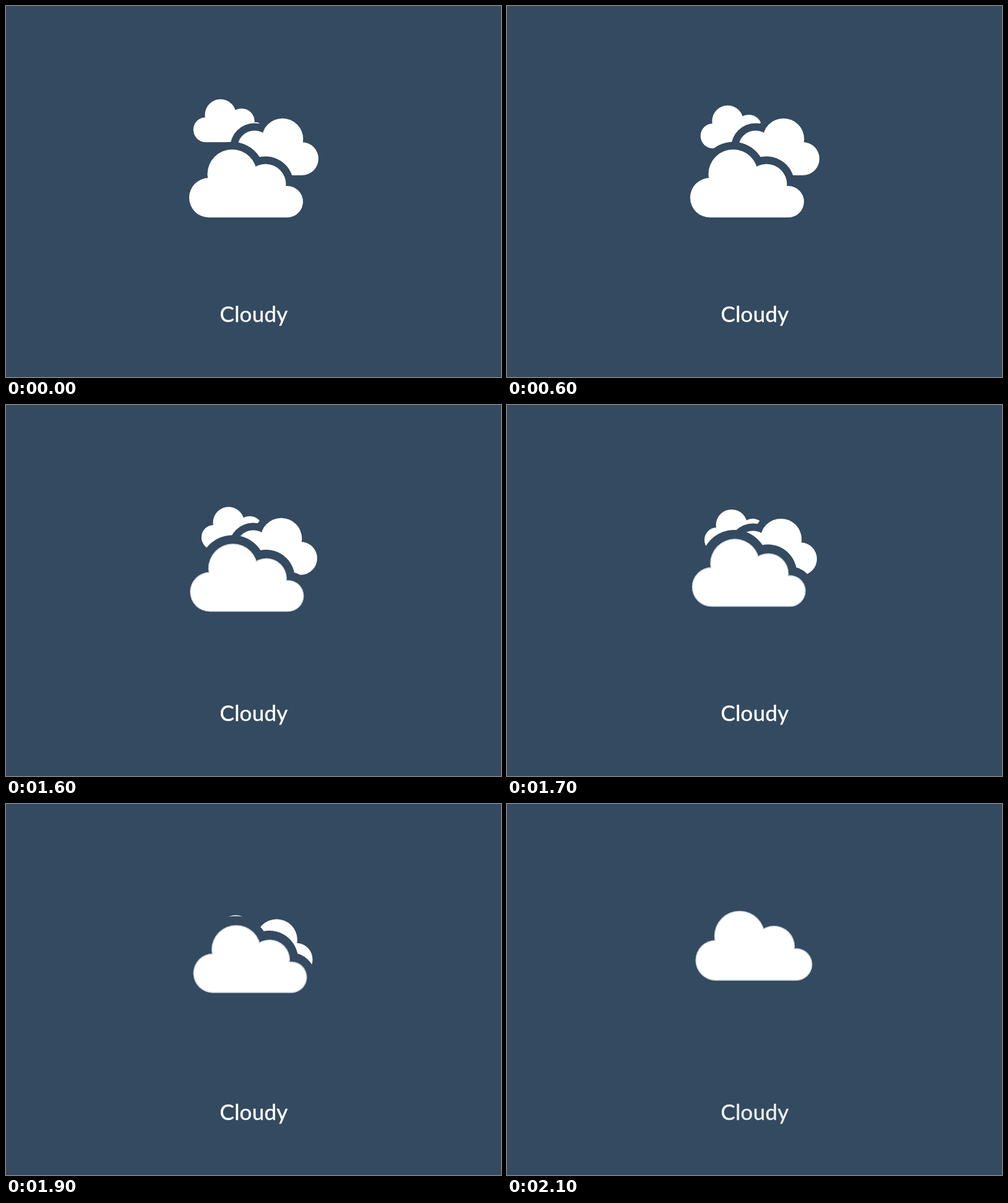
Write an HTML page with a canvas that moves like this. It is 800 px wide and 600 px high and loops after 2.2 s.

```html
<!DOCTYPE html>
<html lang="en">
<head>
<meta charset="utf-8">
<title>Cloudy</title>
<style>
  html, body { margin: 0; width: 100%; height: 100%; overflow: hidden; background: #334a60; }
  canvas, svg { position: absolute; left: 0; top: 0; display: block; }
  text { font: 400 35px Lato, "Open Sans", sans-serif; fill: #fff; stroke: #fff; stroke-width: .5px; }
</style>
</head>
<body>
<canvas id="sky" width="800" height="600"></canvas>
<svg width="800" height="600"><text id="label" x="400.5" y="510.5" text-anchor="middle" letter-spacing=".2">Cloudy</text></svg>
<script>
const LOOP = 2200, STEP = 100;
const BG = '#334a60', WHITE = '#fff';

// Cloud lobes as x, y, radius, measured from the centre of the outer lobe
const LOBES = [[0, 0, 32], [37.5, -38, 40], [91.5, -21.5, 33], [126.5, 6.5, 25.5]];

const ctx = document.getElementById('sky').getContext('2d');
const label = document.getElementById('label');

function cloud(x, y, size, flip, grow, color) {
  const g = grow / size;
  ctx.save();
  ctx.translate(x, y);
  ctx.scale(flip * size, size);
  ctx.beginPath();
  for (const [cx, cy, r] of LOBES) {
    ctx.moveTo(cx + r + g, cy);
    ctx.arc(cx, cy, r + g, 0, Math.PI * 2);
  }
  ctx.rect(0, -10, 126.5, 42 + g);
  ctx.fillStyle = color;
  ctx.fill();
  ctx.restore();
}

// White cloud whose rim darkens softly towards the edge
function frontCloud(x, y, size, shade) {
  cloud(x, y, size, 1, 0, WHITE);
  if (shade <= 0) return;
  cloud(x, y, size, 1, 0, `rgba(52,84,114,${shade})`);
  cloud(x, y, size, 1, -.9, WHITE);
  cloud(x, y, size, 1, -.9, `rgba(52,84,114,${shade / 3})`);
  cloud(x, y, size, 1, -1.8, WHITE);
}

function draw(step) {
  const slide = 10 * Math.max(0, 1 - step / 6) ** 2;      // back cloud settles in
  const phase = Math.PI * Math.max(0, step - 13.8) / 10.5;
  const rise = 36.9 * (1 - Math.cos(phase));              // front cloud climbs
  const late = Math.max(0, step - 19);
  const size = 1 + .0135 * late;
  const lift = Math.min(1, rise / 10);

  ctx.fillStyle = BG;
  ctx.fillRect(0, 0, 800, 600);

  cloud(333 - slide + rise * .4, 210.1 - slide + rise * .52, .632, 1, 0, WHITE);

  const mx = 478.2 - rise * .26, my = 247 + rise * .124;
  cloud(mx, my, .836, -1, 12, BG);
  cloud(mx, my, .836, -1, 0, WHITE);

  const fx = 328 + rise * .18 - .45 * late, fy = 310 - rise;
  cloud(fx - .7 * lift, fy - .5 * lift, size, 1, 12.2 + 1.7 * lift, BG);
  frontCloud(fx, fy, size, .42 * Math.sin(phase));

  label.style.opacity = 1 - .002 * slide - .045 * late;
}

const start = performance.now();
function tick() {
  const t = Math.max(0, performance.now() - start) % LOOP;
  draw(Math.floor(t / STEP));
  requestAnimationFrame(tick);
}
tick();
</script>
</body>
</html>
```
